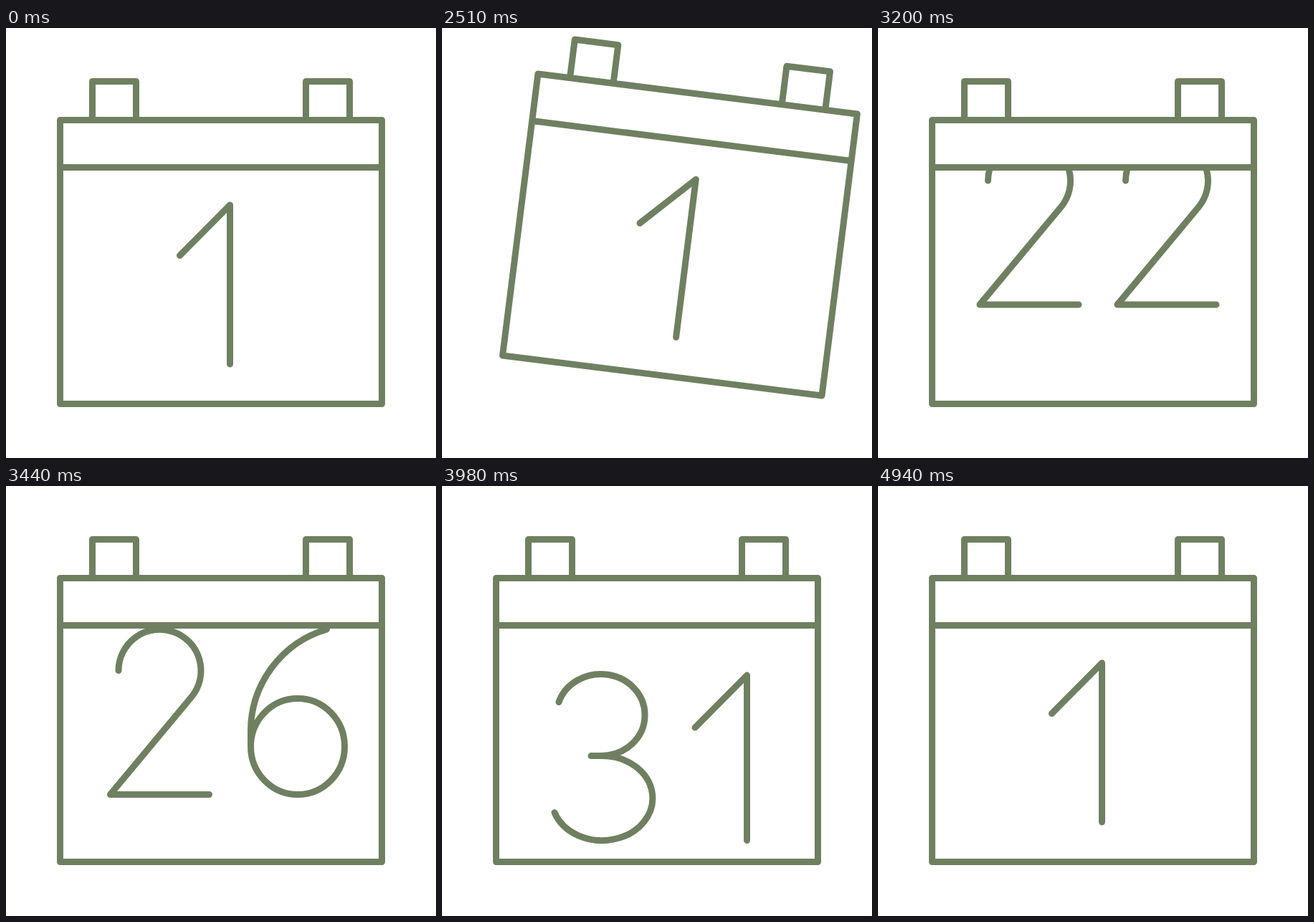
Animation, 600 px wide and 600 px high, one loop 4.97 s. Source, as an HTML page:

```html
<!DOCTYPE html>
<html lang="en">
<head>
<meta charset="utf-8">
<style>
html, body { margin: 0; width: 100%; height: 100%; overflow: hidden; background: #fff; }
svg { display: block; width: 100%; height: 100%; }
</style>
</head>
<body>
<svg viewBox="0 0 600 600">
  <defs><clipPath id="page"><rect x="80" y="194.5" width="440" height="325.5"/></clipPath></defs>
  <g id="calendar" fill="none" stroke="#6f8061" stroke-width="9" stroke-linecap="round" stroke-linejoin="round">
    <g id="wheel" clip-path="url(#page)"></g>
    <path d="M75.5 128.5H524.5V524.5H75.5ZM75.5 194.5H524.5M120.5 128.5V74.5H181.5V128.5M418.5 128.5V74.5H479.5V128.5"/>
  </g>
</svg>
<script>
const LOOP = 4970, START = 2000, STEP = 30;
const LAST = 31, SPACING = 400, BASELINE = 469;

// Digit outlines: left edge at x = 0, baseline at y = 0.
const DIGITS = [
  'M0-115A66 115 0 0 1 132-115A66 115 0 0 1 0-115Z',
  'M0-157.5L72.5-230.5V0',
  'M11.5-173A57.5 57.5 0 1 1 114-137L0 0H138',
  'M6-193A61.5 56.5 0 0 1 126-174.5A61.5 56.5 0 0 1 65-118H51M65-118A70.5 59 0 1 1 0-39',
  'M104 0V-230.5L0-60H138',
  'M118-230.5H30L17-128A72 72 0 1 1 0-34',
  'M106-230.5A148 148 0 0 0 0-88V-67M0-67A65.5 67 0 0 1 131-67A65.5 67 0 0 1 0-67Z',
  'M0-230.5H132L38 0',
  'M68-122A57 54 0 1 1 69-122A67 61 0 1 1 68-122Z',
  'M0-163A65.5 67.5 0 0 1 131-163A65.5 67.5 0 0 1 0-163ZM131-163V-142A148 148 0 0 1 24.5 0'
];
const UNIT_X = [345.5, 353, 334, 338, 332, 340, 341.5, 340, 342, 341.5];
const SINGLE_X = 232;

const calendar = document.getElementById('calendar');
const wheel = document.getElementById('wheel');

function add(parent, tag, attrs) {
  const el = document.createElementNS('http://www.w3.org/2000/svg', tag);
  for (const key in attrs) el.setAttribute(key, attrs[key]);
  return parent.appendChild(el);
}

function tensX(tens, unit) {
  if (tens === 1) return 180;
  if (tens === 2) return unit === 2 ? 142 : 145.5;
  return unit === 0 ? 150 : 157;
}

function makeNumber(n) {
  const group = add(wheel, 'g', {});
  const tens = Math.floor(n / 10), unit = n % 10;
  const digit = (d, x) => add(group, 'path', { d: DIGITS[d], transform: `translate(${x} 0)` });
  if (n === 1) {
    add(group, 'path', { d: 'M242.5-151.5L312.5-222V0' });
  } else if (!tens) {
    digit(unit, SINGLE_X);
  } else {
    digit(tens, tensX(tens, unit));
    digit(unit, UNIT_X[unit]);
  }
  return group;
}

const numbers = Array.from({ length: LAST }, (_, i) => makeNumber(i + 1));

const progress = (t, from, to) => Math.min(1, Math.max(0, (t - from) / (to - from)));
const smooth = u => u * u * (3 - 2 * u);
const mix = (a, b, u) => a + (b - a) * u;

// Swing as [angle, dx, dy]
const REST = [0, 0, 0], LIFTED = [8, 35.2, -43], LANDED = [-1.4, -1, 13];

function swing(t) {
  const blend = (a, b, u) => a.map((v, i) => mix(v, b[i], u));
  if (t < 2360) return blend(REST, LIFTED, smooth(progress(t, START, 2330)));
  if (t < 2810) return blend(LIFTED, LANDED, progress(t, 2360, 2810) ** 2.2);
  return blend(LANDED, REST, smooth(progress(t, 2810, 3080)));
}

// The wheel is spun once and slows down exponentially.
function wheelOffset(t) {
  const spun = 14461 - 5275 * Math.exp(-0.0467 * (t - 3200) / STEP);
  return Math.max(BASELINE + SPACING, spun);
}

function returnY(t) {
  if (t < 4450) return mix(139, 483.5, smooth(progress(t, 4130, 4450)));
  if (t < 4820) return mix(483.5, 468.3, smooth(progress(t, 4450, 4820)));
  return mix(468.3, BASELINE, smooth(progress(t, 4820, 4960)));
}

function draw(t) {
  const [angle, dx, dy] = swing(t);
  calendar.setAttribute('transform', `translate(${dx} ${dy}) rotate(${angle} 300 326.5)`);

  const offset = wheelOffset(t);
  numbers.forEach((el, i) => {
    const n = i + 1;
    let y = offset - n * SPACING;
    if (t >= 4130) y = n === 1 ? returnY(t) : -1;
    const visible = y > 185 && y < 765;
    el.setAttribute('display', visible ? 'inline' : 'none');
    if (visible) el.setAttribute('transform', `translate(0 ${y})`);
  });
}

const origin = performance.now();
function tick() {
  const t = (performance.now() - origin) % LOOP;
  draw(t < START ? 0 : START + Math.floor((t - START) / STEP) * STEP);
  requestAnimationFrame(tick);
}
draw(0);
requestAnimationFrame(tick);
</script>
</body>
</html>
```
